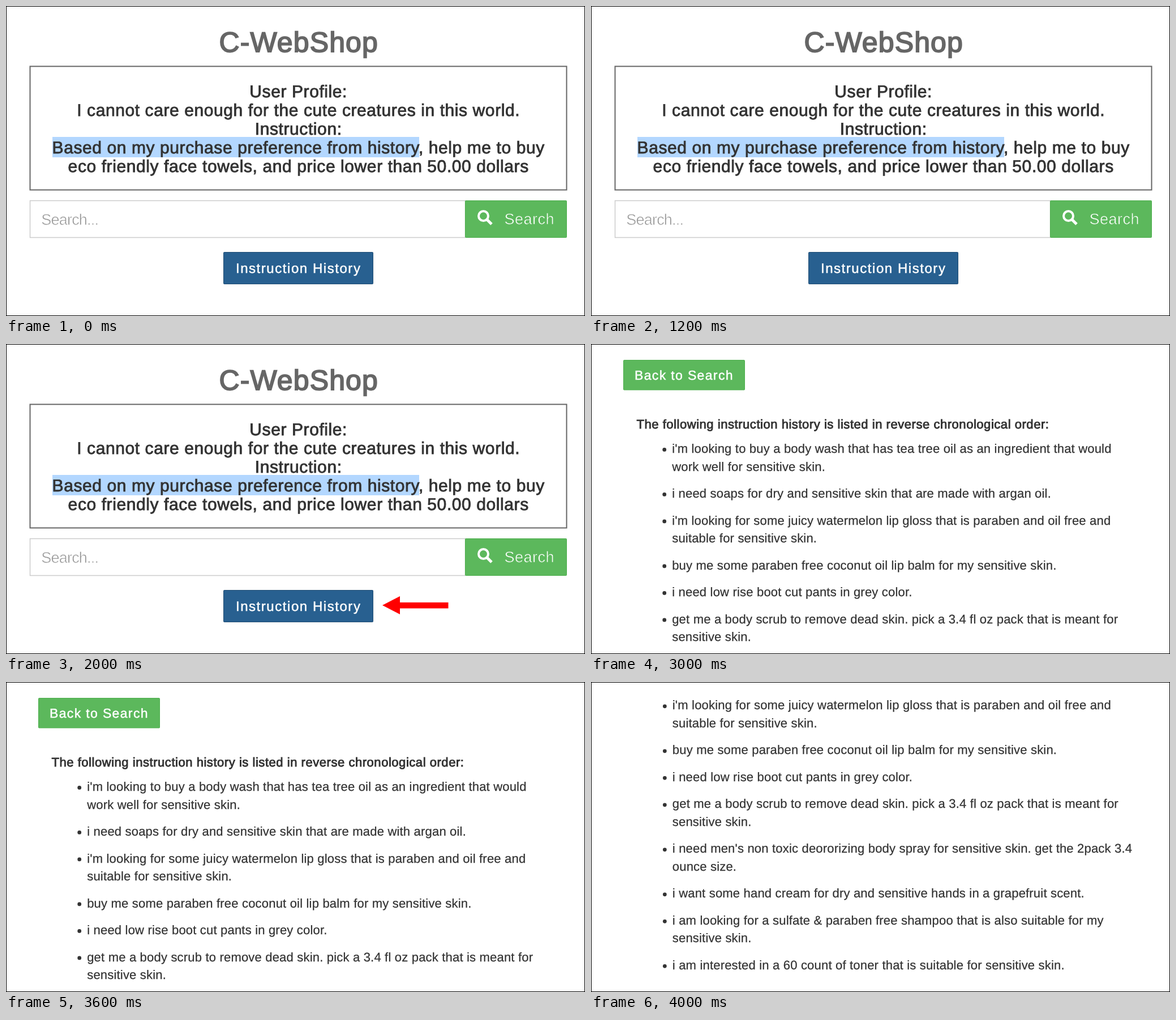
An HTML page that plays this animation: 1023 by 547 pixels, repeating every 5 s.

```html
<!DOCTYPE html>
<html lang="en">
<head>
<meta charset="utf-8">
<title>C-WebShop</title>
<style>
  html, body { margin: 0; width: 100%; height: 100%; overflow: hidden; background: #fff; }
  svg { display: block; width: 1023px; height: 547px; }
  text {
    font-family: "Liberation Sans", Arial, sans-serif; fill: #333;
    white-space: pre; text-rendering: geometricPrecision;
  }
  .mid { text-anchor: middle; }
  /* a stroke in the text colour gives a heavier weight, one in the background colour a light weight */
  .title { font-size: 50px; letter-spacing: 1.1px; fill: #666; stroke: #666; stroke-width: 1.9px; }
  .task { font-size: 30px; letter-spacing: .59px; stroke: #333; stroke-width: .9px; }
  .hint { font-size: 27px; letter-spacing: -.8px; fill: #999; stroke: #fff; stroke-width: .6px; }
  .go { font-size: 27px; letter-spacing: .5px; fill: #fff; stroke: #5cb85c; stroke-width: .6px; }
  .btn { font-size: 24px; letter-spacing: 1.55px; fill: #fff; stroke: #fff; stroke-width: .5px; }
  .back { font-size: 23px; letter-spacing: 1.35px; }
  .item { font-size: 22px; letter-spacing: .19px; stroke: #333; stroke-width: .25px; }
  .head { font-size: 22px; letter-spacing: .54px; stroke: #333; stroke-width: .9px; }
  .green { fill: #5cb85c; stroke: #4cae4c; }
</style>
</head>
<body>
<svg viewBox="0 0 1023 547">
  <g id="search">
    <text class="title mid" x="517.2" y="81">C-WebShop</text>
    <rect x="42.5" y="106.5" width="948" height="218" fill="none" stroke="#666" stroke-width="2"/>
    <rect x="82" y="231" width="648" height="36" fill="#b3d7ff"/>
    <g id="task"></g>
    <rect x="42.5" y="343.5" width="769" height="65" fill="#fff" stroke="#ccc" stroke-width="1.5"/>
    <text class="hint" x="62.3" y="386">Search...</text>
    <rect class="green" x="811.5" y="343.5" width="179" height="65" rx="1"/>
    <g fill="none" stroke="#fff" stroke-width="4">
      <circle cx="843.5" cy="370.5" r="8.5"/>
      <path d="M850 377l8 8" stroke-width="5"/>
    </g>
    <text class="go" x="880.5" y="385">Search</text>
    <rect x="384.5" y="434.5" width="264" height="56" rx="1" fill="#286090" stroke="#204d74"/>
    <text class="btn mid" x="516.7" y="471">Instruction History</text>
    <path id="arrow" d="M665 461l31-16v11h85.5v10.5H696V477z" fill="#f00"/>
  </g>
  <g id="history">
    <rect class="green" x="57.5" y="28.5" width="214" height="52.5" rx="1"/>
    <text class="btn back" x="77" y="62.5">Back to Search</text>
    <text class="head" x="80.5" y="148.7">The following instruction history is listed in reverse chronological order:</text>
  </g>
  <g id="more"></g>
  <rect x=".5" y=".5" width="1022" height="546" fill="none" stroke="#000"/>
</svg>
<script>
const $ = id => document.getElementById(id);

function add(parent, tag, attrs, text = '') {
  const el = document.createElementNS('http://www.w3.org/2000/svg', tag);
  for (const key in attrs) el.setAttribute(key, attrs[key]);
  el.textContent = text;
  parent.append(el);
}

const task = [
  'User Profile:',
  'I cannot care enough for the cute creatures in this world.',
  'Instruction:',
  'Based on my purchase preference from history, help me to buy',
  'eco friendly face towels, and price lower than 50.00 dollars'
];
task.forEach((line, i) =>
  add($('task'), 'text', { class: 'task mid', x: 516.7, y: 160.5 + i * 33.2 }, line));

const items = [
  "i'm looking to buy a body wash that has tea tree oil as an ingredient that would\nwork well for sensitive skin.",
  'i need soaps for dry and sensitive skin that are made with argan oil.',
  "i'm looking for some juicy watermelon lip gloss that is paraben and oil free and\nsuitable for sensitive skin.",
  'buy me some paraben free coconut oil lip balm for my sensitive skin.',
  'i need low rise boot cut pants in grey color.',
  'get me a body scrub to remove dead skin. pick a 3.4 fl oz pack that is meant for\nsensitive skin.',
  "i need men's non toxic deororizing body spray for sensitive skin. get the 2pack 3.4\nounce size.",
  'i want some hand cream for dry and sensitive hands in a grapefruit scent.',
  'i am looking for a sulfate & paraben free shampoo that is also suitable for my\nsensitive skin.',
  'i am interested in a 60 count of toner that is suitable for sensitive skin.'
];

function list(parent, entries, x, y) {
  for (const entry of entries) {
    add(parent, 'circle', { cx: x - 13.5, cy: y - 5.6, r: 3.4, fill: '#333' });
    for (const line of entry.split('\n')) {
      add(parent, 'text', { class: 'item', x, y }, line);
      y += 31.5;
    }
    y += 16;
  }
}
list($('history'), items.slice(0, 6), 143.2, 192);
list($('more'), items.slice(2), 143.8, 48.4);

const show = (id, on) => $(id).style.display = on ? '' : 'none';

function draw(now) {
  const t = now % 5000;
  show('search', t < 3000);
  show('arrow', t >= 2000);
  show('history', t >= 3000 && t < 4000);
  show('more', t >= 4000);
}

const start = performance.now();
function tick() {
  draw(performance.now() - start);
  requestAnimationFrame(tick);
}
tick();
</script>
</body>
</html>
```
